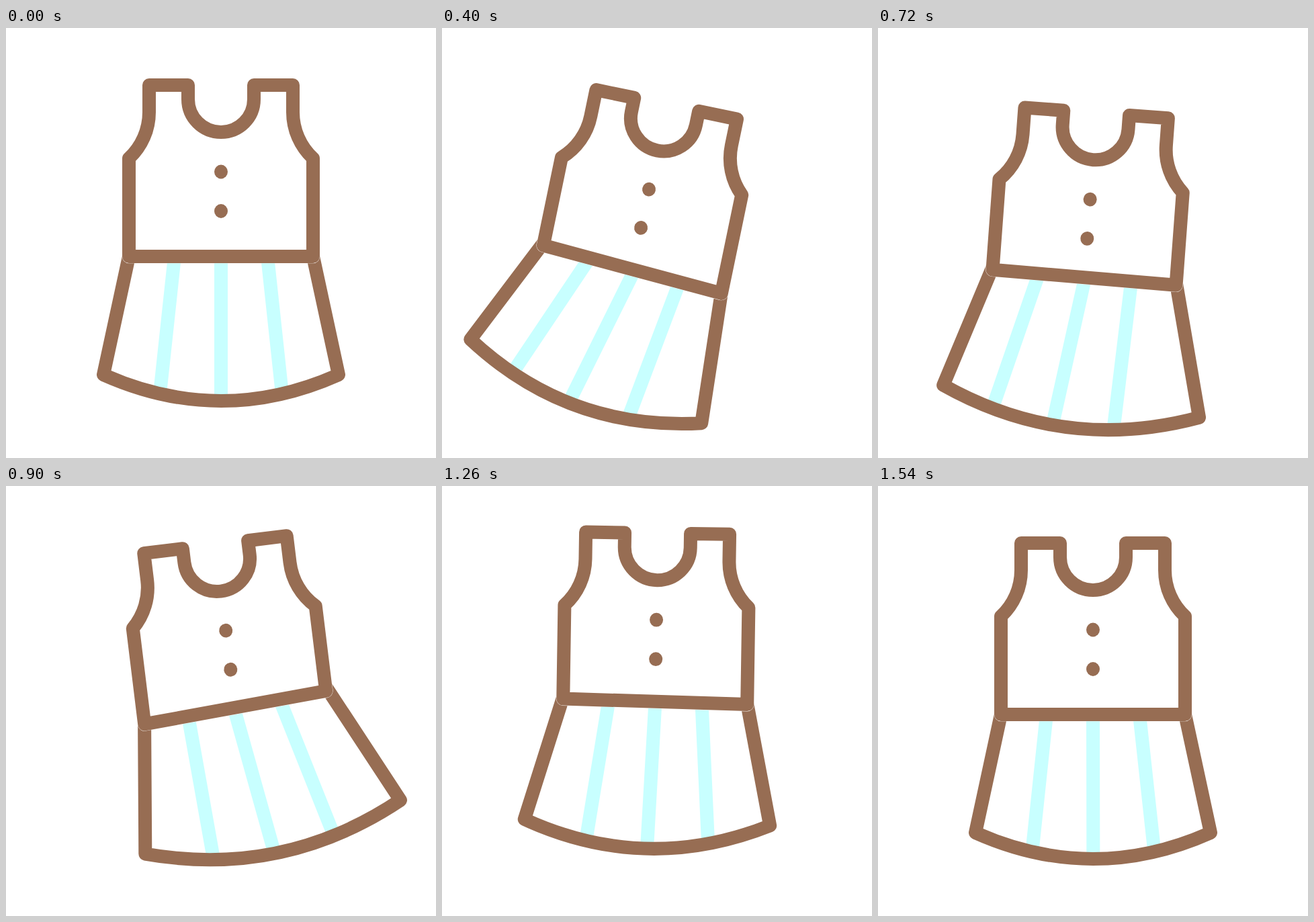
Write an HTML page that moves like this. It is 640 by 640 pixels and loops after 1.8 s.

```html
<!DOCTYPE html>
<html lang="en">
<head>
<meta charset="utf-8">
<title>Swinging dress</title>
<style>
  html, body { margin: 0; width: 100%; height: 100%; overflow: hidden; background: #fff; }
  svg { display: block; width: 100%; height: 100%; }
  path { fill: none; stroke: #976d53; stroke-width: 20; stroke-linejoin: round; }
  #stripes { stroke: #c8ffff; }
  #gap { stroke: #fff; stroke-width: 20.7; }
  ellipse { fill: #976d53; }
</style>
</head>
<body>
<svg viewBox="0 0 640 640">
  <g id="dress">
    <path id="stripes"/>
    <path id="skirt"/>
    <path id="gap"/>
    <path id="bodice"/>
    <ellipse cx="320" cy="214" rx="10" ry="10.4"/>
    <ellipse cx="320" cy="272.5" rx="10" ry="10.4"/>
  </g>
</svg>
<script>
const LOOP = 1800, LAG = 25;

// Key points: time, then degrees or pixels
const TILT = [[0, 0], [550, 14.3], [905, -7], [1130, 4.5], [1360, -1.5], [1540, 0]];
const SWING = [[0, 0], [550, 13.5], [905, -11.1], [1130, 6.5], [1360, 0.6], [1540, 0]];
const BOUNCE = [[0, 0], [680, 43.3], [1080, -28.7], [1450, 0]];
const FLARE = [[0, 0], [905, 38], [1540, 0]];

const el = id => document.getElementById(id);
const rad = deg => deg * Math.PI / 180;
const ease = x => x * x * (3 - 2 * x);
const mix = (a, b, u) => a + (b - a) * u;
const str = p => p.map(v => v.toFixed(2)).join(' ');

function sample(keys, t) {
  const i = keys.findIndex(k => k[0] > t);
  if (i < 0) return keys[keys.length - 1][1];
  const [t0, a] = keys[i - 1], [t1, b] = keys[i];
  return mix(a, b, ease((t - t0) / (t1 - t0)));
}

// Point a little past "from", on the line coming from "to"
function extend(from, to, len) {
  const dx = from[0] - to[0], dy = from[1] - to[1], k = len / Math.hypot(dx, dy);
  return [from[0] + dx * k, from[1] + dy * k];
}

function draw(t) {
  const tilt = sample(TILT, t), swing = sample(SWING, t);
  const lift = sample(BOUNCE, t), flare = sample(FLARE, t);
  const late = sample(TILT, Math.max(0, t - LAG));

  // The hem is pulled up on the side the skirt swings to
  const liftL = 0.28 * flare + 0.73 * swing, liftR = 0.28 * flare - 0.73 * swing;
  const hemL = [183, 340 - liftL], hemR = [457, 340 - liftR];

  // The skirt edge hangs like a pendulum below the hem and turns with the tilt
  const a = rad(0.7 * tilt), half = 175 + flare / 2;
  const mx = 320 - 176 * Math.sin(rad(swing)), my = 340 + 176 * Math.cos(rad(swing));
  const dx = half * Math.cos(a), dy = half * Math.sin(a);
  const bx = -78 * Math.sin(a), by = 78 * Math.cos(a);
  const L = [mx - dx, my - dy], R = [mx + dx, my + dy];

  const edgeAt = x => {
    let u = 0.5;
    for (let i = 0; i < 4; i++) u = (x - L[0] - 2 * u * (1 - u) * bx) / (2 * dx);
    return [x, L[1] + u * 2 * dy + 2 * u * (1 - u) * by];
  };
  const stripe = n => {
    const u = 0.5 + n * 0.252;
    const top = [mix(hemL[0], hemR[0], u) + 0.3 * tilt, mix(hemL[1], hemR[1], u)];
    return `M${str(top)}L${str(edgeAt(320 + n * 91 - 4.8 * late))}`;
  };
  const anchorL = [183, hemL[1] - 0.4 * liftL], anchorR = [457, hemR[1] - 0.4 * liftR];

  const top = 'M271 85V106A49 49 0 0 0 369 106V85H427V125A94 94 0 0 0 457 194' +
    `L${str(hemR)}L${str(hemL)}L183 194A94 94 0 0 0 213 125V85Z`;
  el('bodice').setAttribute('d', top);
  el('gap').setAttribute('d', top);
  el('skirt').setAttribute('d', `M${str(extend(anchorL, L, 4))}L${str(L)}` +
    `Q${str([mx + bx, my + by])} ${str(R)}L${str(extend(anchorR, R, 4))}`);
  el('stripes').setAttribute('d', [-1, 0, 1].map(stripe).join(''));
  el('dress').setAttribute('transform',
    `translate(0 ${lift.toFixed(2)}) rotate(${tilt.toFixed(3)} 320 155)`);
}

const start = performance.now();
function frame() {
  draw((performance.now() - start) % LOOP);
  requestAnimationFrame(frame);
}
frame();
</script>
</body>
</html>
```
